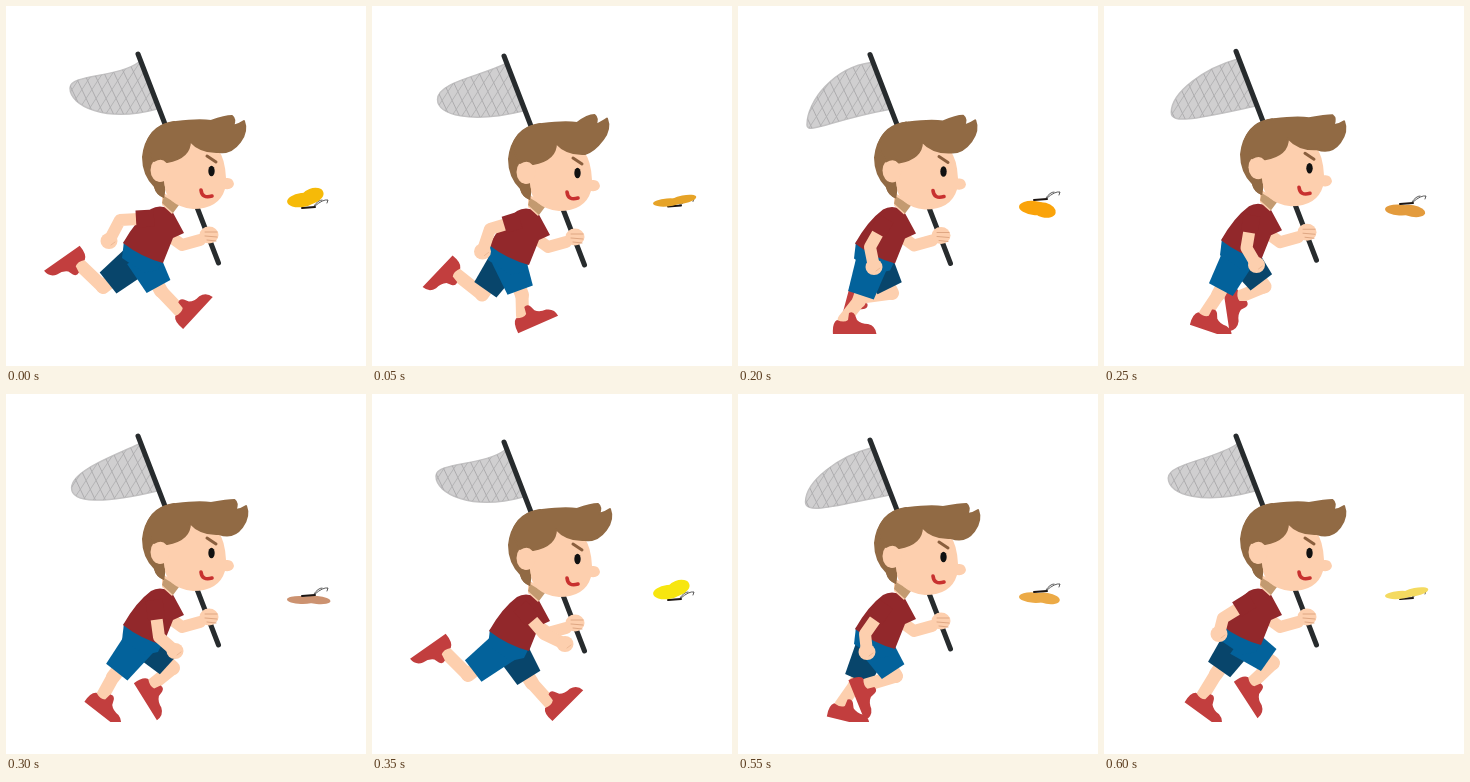
An HTML page with a canvas that plays this animation: 360x360 px, repeating every 650 ms.

```html
<!DOCTYPE html>
<html lang="en">
<head>
<meta charset="utf-8">
<title>Butterfly chase</title>
<style>
html, body { margin: 0; width: 100%; height: 100%; overflow: hidden; background: #fff; }
canvas { display: block; width: 360px; height: 360px; }
</style>
</head>
<body>
<canvas id="stage" width="360" height="360"></canvas>
<script>
const ctx = document.getElementById('stage').getContext('2d');
const STEP = 50, STEPS = 13;
const SKIN = '#fdcfae', HAIR = '#916a44', SHIRT = '#92282b', RED = '#c23e3e';
const BLUE = '#03629b', NAVY = '#08456b', POLE = '#272b2d';

// Legs: knee x, y, ankle x, y, foot angle. Arm: elbow x, y, hand x, y.
// Fly: wing lift, height, r, g, b.
const keys = [
  { at: 0, bob: 0, net: 82, arm: [114, 214, 103, 235],
    near: [155, 285, 174, 305, -47], far: [97, 281, 73, 258, 145], fly: [1, 201, 246, 186, 8] },
  { at: 2, bob: 4, net: 105, arm: [122, 232, 118, 256],
    near: [145, 293, 127, 314, 0], far: [123, 296, 94, 277, 122], fly: [0, 198, 214, 140, 70] },
  { at: 4, bob: 0.5, net: 119, arm: [132, 241, 136, 261],
    near: [121, 295, 106, 314, 0], far: [154, 287, 124, 291, 105], fly: [-1, 193, 250, 163, 10] },
  { at: 6, bob: -6, net: 94, arm: [153, 243, 169, 257],
    near: [107, 283, 96, 303, 38], far: [167, 274, 146, 291, 58], fly: [-0.5, 201, 204, 146, 112] },
  { at: 7, bob: 0, net: 82, arm: [172, 240, 193, 250],
    near: [96, 281, 73, 258, 145], far: [160, 289, 178, 309, -45], fly: [1, 205, 247, 230, 15] },
  { at: 9, bob: 4, net: 105, arm: [159, 251, 178, 265],
    near: [127, 297, 98, 288, 120], far: [158, 287, 153, 314, 0], fly: [0, 203, 150, 96, 60] },
  { at: 11, bob: -2, net: 108, arm: [127, 240, 129, 258],
    near: [158, 282, 128, 291, 68], far: [117, 291, 103, 311, 14], fly: [-0.7, 197, 236, 170, 70] },
  { at: 12, bob: -6, net: 84, arm: [119, 224, 115, 240],
    near: [169, 269, 148, 289, 57], far: [112, 280, 98, 303, 36], fly: [0.5, 204, 244, 218, 96] }
];

const mix = (a, b, u) => Array.isArray(a) ? a.map((v, i) => mix(v, b[i], u)) : a + (b - a) * u;

function poseAt(step) {
  let i = keys.length - 1;
  while (keys[i].at > step) i--;
  const a = keys[i], b = keys[i + 1] || a;
  const u = b === a ? 0 : (step - a.at) / (b.at - a.at);
  const pose = {};
  for (const name in a) pose[name] = mix(a[name], b[name], u);
  return pose;
}

function line(color, width, points, cap = 'round') {
  ctx.beginPath();
  points.forEach(([x, y]) => ctx.lineTo(x, y));
  ctx.strokeStyle = color;
  ctx.lineWidth = width;
  ctx.lineCap = cap;
  ctx.lineJoin = 'round';
  ctx.stroke();
}

function shape(color, points) {
  ctx.beginPath();
  points.forEach(([x, y]) => ctx.lineTo(x, y));
  ctx.fillStyle = color;
  ctx.fill();
}

function oval(color, x, y, rx, ry = rx, turn = 0) {
  ctx.beginPath();
  ctx.ellipse(x, y, rx, ry, turn, 0, 7);
  ctx.fillStyle = color;
  ctx.fill();
}

function pathFill(color, d) {
  ctx.fillStyle = color;
  ctx.fill(new Path2D(d));
}

function pathLine(color, width, d) {
  ctx.strokeStyle = color;
  ctx.lineWidth = width;
  ctx.lineCap = ctx.lineJoin = 'round';
  ctx.stroke(new Path2D(d));
}

function net(y, lobe) {
  const u = (lobe - 82) / 37, x = 64 + 5 * u;
  ctx.save();
  ctx.beginPath();
  ctx.moveTo(133, 56 + y);
  ctx.bezierCurveTo(112 - 16 * u, 72 - 11 * u + y, x, lobe - 14 - 10 * u, x, lobe);
  ctx.bezierCurveTo(x, lobe + 18 - 8 * u, 100 - 5 * u, 117 - 4 * u + y, 151, 103 + y);
  ctx.closePath();
  ctx.fillStyle = '#d0cfd0';
  ctx.fill();
  ctx.strokeStyle = '#c2c1c2';
  ctx.lineWidth = 1.5;
  ctx.stroke();
  ctx.clip();
  for (let i = -4; i < 12; i++) {
    const p = 50 + i * 10;
    line('#aaa9ab', 0.9, [[p, 50 + y], [p + 36, 126 + y]]);
    line('#b2b1b3', 0.9, [[p + 28, 50 + y], [p - 22, 126 + y]]);
  }
  ctx.restore();
}

function shoe(x, y, degrees) {
  ctx.save();
  ctx.translate(x, y);
  ctx.rotate(degrees * Math.PI / 180);
  pathFill(RED, 'M-11 14.5Q-12 3-7 0Q0 3 4 0L5-7Q9-9 11-5L13 0Q17 4 24 4Q32 6 32.5 14.5Z');
  ctx.restore();
}

function leg(hip, [kx, ky, ax, ay, turn], color) {
  const [hx, hy] = hip;
  const hem = mix(hip, [kx, ky], 0.87);
  const len = Math.hypot(kx - hx, ky - hy);
  const nx = (hy - ky) / len, ny = (kx - hx) / len;
  line(SKIN, 14, [hip, [kx, ky]]);
  line(SKIN, 13, [[kx, ky], [ax, ay]]);
  shoe(ax, ay, turn);
  const side = ([x, y], w) => [x + nx * w, y + ny * w];
  shape(color, [side(hip, 17), side(hem, 13.5), side(hem, -13.5), side(hip, -17)]);
}

function gripArm() {
  line(SKIN, 12, [[165, 231], [176, 239], [194, 234]]);
  oval(SKIN, 203, 229, 9.5, 8.5);
  pathLine('#dfa783', 1, 'M199 226L211 226M199 230L211 231M201 234L210 235');
}

function swingArm([ex, ey, hx, hy], y) {
  const top = [148, 212 + y];
  line(SKIN, 12, [mix(top, [ex, ey], 0.45), [ex, ey], [hx, hy]]);
  oval(SKIN, hx, hy, 8.5, 8);
  pathLine('#e9b38f', 0.8, `M${hx + 2} ${hy + 4}l4 -3`);
  line(SHIRT, 17, [top, mix(top, [ex, ey], 0.53)], 'butt');
}

function head(lift) {
  const x1 = 228 - 7 * lift, y1 = 110 - 6 * lift;
  const x2 = 239 - 6 * lift, y2 = 115 - 9 * lift;
  // back of the hair, face, ear
  pathFill(HAIR, 'M158 192Q150 189 148 181Q136 169 136 151Q139 121 168 115L205 120L195 165L160 180Z');
  pathFill(SKIN, 'M158 160L183 134L212 144Q219 152 220 172Q227 171 228 178Q227 184 219 183Q213 203 187 203Q159 200 158 176Z');
  oval(SKIN, 154, 164, 9.5, 12);
  pathFill(HAIR, 'M150 175Q157 177 159 181L158 192Q150 189 148 181Z');
  // fringe and tuft
  const fringe = `M140 140Q146 118 170 116Q193 113 205 115Q${x1 - 9} ${y1} ${x1 - 2} ${y1}
    Q${x1 + 2} ${y1 + 3} ${x1 - 1} ${y1 + 10}Q${x2 - 5} ${y2 + 3} ${x2 - 1} ${y2}
    Q${x2 + 3} ${y2 + 10} ${x2 - 5} ${y2 + 21}Q${x2 - 14} ${y2 + 33} 213 146Q195 147 184 135
    Q184 152 161 156Q156 150 148 155Z`;
  pathFill(HAIR, fringe);
  pathLine(HAIR, 2, fringe);
  pathLine('#8a5f3e', 3, 'M201 150L210 156');
  oval('#111', 205.5, 165, 3.2, 5.3);
  pathLine('#c8312f', 3.6, 'M195 184Q196 193 206 190');
}

function butterfly([lift, y, r, g, b]) {
  const open = Math.abs(lift), color = `rgb(${r},${g},${b})`, turn = -0.05 - 0.3 * lift;
  const body = () => {
    line('#1c1512', 2, [[296, y + 1], [309, y]]);
    pathLine('#333', 0.8, `M308 ${y - 1}Q312 ${y - 7} 316 ${y - 7}M309 ${y - 1}Q317 ${y - 8} 322 ${y - 7}L321 ${y - 4}`);
  };
  if (lift > 0) body();
  oval(color, 294 + 2 * open, y + 1 - 8 * lift, 13 + 2 * open, 1 + 6 * open, turn * 0.4);
  oval(color, 316 - 10 * open, y - 1 + open - 11 * lift, 15 - 3 * open, 0.7 + 6.8 * open, turn);
  if (lift <= 0) body();
}

function draw(step) {
  const { bob, net: lobe, arm, near, far, fly } = poseAt(step);
  const hip = [136, 250 + bob * 0.7];
  const atBody = (fn) => {
    ctx.save();
    ctx.translate(0, bob);
    fn();
    ctx.restore();
  };
  ctx.fillStyle = '#fff';
  ctx.fillRect(0, 0, 360, 360);
  ctx.save();
  ctx.beginPath();
  ctx.rect(0, 0, 360, 328);
  ctx.clip();
  net(bob, lobe);
  atBody(() => {
    line(POLE, 5, [[132, 48], [212.5, 257]]);
    gripArm();
  });
  leg(hip, far, NAVY);
  leg(hip, near, BLUE);
  atBody(() => {
    shape(BLUE, [[118, 235], [157, 254], [152, 264], [138, 267], [116, 252]]);
    pathFill(SHIRT, 'M117 237Q130 214 145 203Q153 198 165 203L178 227L167 232L157 257Q135 251 117 237Z');
    shape(SKIN, [[156, 186], [156, 199], [166, 208], [174, 196]]);
    shape('#c39a70', [[158, 190], [156, 197], [167, 207], [173, 199]]);
  });
  swingArm(arm, bob);
  atBody(() => head(Math.max(-0.35, Math.min(1, bob / 4))));
  butterfly(fly);
  ctx.restore();
}

const start = performance.now();
function tick() {
  draw(Math.floor((performance.now() - start) / STEP) % STEPS);
  requestAnimationFrame(tick);
}
tick();
</script>
</body>
</html>
```
